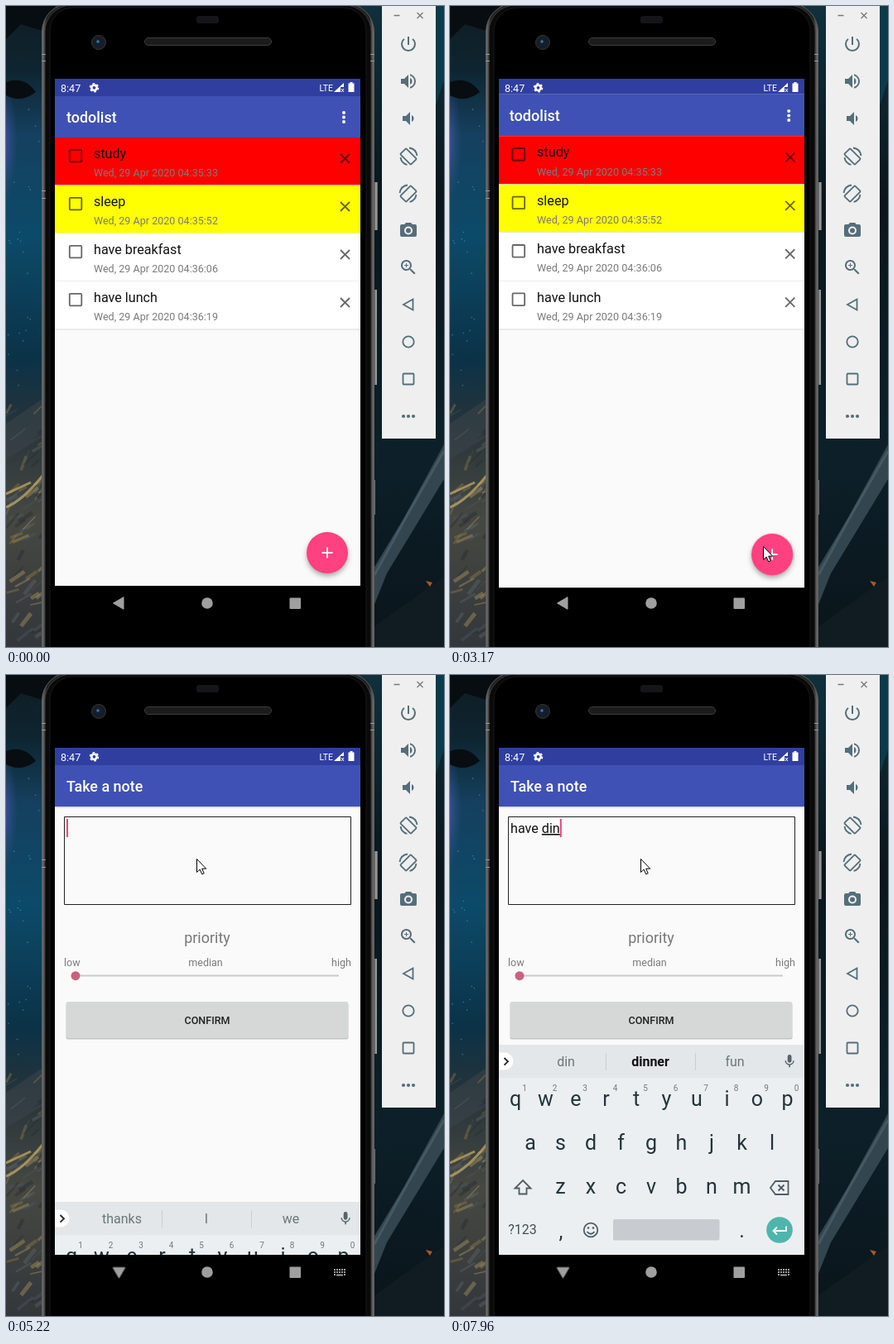
Animation of 529 by 775 pixels, one loop 8 s. Source, as an HTML page:

```html
<!DOCTYPE html>
<html lang="en">
<head>
<meta charset="utf-8">
<title>Todo list</title>
<style>
html, body { margin: 0; width: 100%; height: 100%; overflow: hidden; background: #0b1a24; }
svg { display: block; }
text { font-family: Roboto, sans-serif; white-space: pre; }
.mid { text-anchor: middle; }
.end { text-anchor: end; }
.title { font-size: 17.95px; font-weight: 500; fill: #fff; }
.item { font-size: 16.15px; fill: #111; }
.small { font-size: 12.57px; fill: #7b7b7b; }
.line { fill: none; stroke-width: 1.8; }
.key { font-size: 25px; fill: #22343c; text-anchor: middle; }
.hint { font-size: 10px; fill: #6f7b81; text-anchor: middle; }
.word { font-size: 16px; fill: #6b767b; text-anchor: middle; }
.bold { font-weight: 700; fill: #111; }
#composing { text-decoration: underline; }

.anim { animation: 8s step-end infinite; }
#cursor { animation-name: cursor; }
#tap { animation-name: tap; }
#ripple { animation-name: ripple; }
#lift { animation-name: lift; }
#list { animation-name: listOut; transform-origin: 243px 394px; }
#note { animation-name: noteIn; transform-origin: 243px 394px; }
#keyboard { animation-name: keyboard; }
#caret { animation-name: caret; }
#back { animation-name: back; transform-origin: 136.5px 722px; }
#ime { animation-name: ime; }
#edges { animation-name: edges; }

@keyframes cursor {
  0% { transform: translate(411px, 800px); }
  6.75% { transform: translate(410px, 766px); }
  7.75% { transform: translate(404px, 744px); }
  8.63% { transform: translate(392px, 718px); }
  9.63% { transform: translate(377px, 692px); }
  10.5% { transform: translate(367px, 673px); }
  11.5% { transform: translate(370px, 660px); }
  12.5% { transform: translate(378px, 653px); }
  45.5% { transform: translate(352px, 592px); }
  46.5% { transform: translate(312px, 499px); }
  47.5% { transform: translate(283px, 417px); }
  48.5% { transform: translate(262px, 350px); }
  49.5% { transform: translate(248px, 300px); }
  50.5% { transform: translate(238px, 262px); }
  51.5% { transform: translate(232px, 238px); }
  52.5% { transform: translate(230px, 226px); }
  53.38%, 100% { transform: translate(230px, 222px); }
}
@keyframes tap {
  0%, 17.5%, 56.38%, 100% { opacity: 0; }
  16.375%, 55.375% { opacity: 1; }
}
@keyframes ripple {
  0%, 25.12%, 100% { opacity: 0; }
  19.25%, 24.12% { opacity: .1; }
  20.25% { opacity: .16; }
  21.25% { opacity: .2; }
}
@keyframes lift {
  0%, 37.75%, 100% { opacity: 0; }
  19.25% { opacity: .4; }
  20.25% { opacity: .7; }
  21.25% { opacity: 1; }
}
@keyframes listOut {
  0%, 100% { transform: none; }
  39.625% { transform: scale(1.0075); }
  40.625% { transform: scale(1.03); }
  41.75% { transform: scale(1.046); }
  43.625%, 99.99% { transform: none; }
}
@keyframes noteIn {
  0% { opacity: 0; transform: scale(.85); }
  40.625% { opacity: .6; transform: scale(.91); }
  41.75% { opacity: 1; transform: scale(.975); }
  43.625%, 100% { opacity: 1; transform: none; }
}
@keyframes keyboard {
  0% { transform: translateY(270px); }
  64.375% { transform: translateY(190px); }
  65.375% { transform: translateY(105px); }
  66.375% { transform: translateY(45px); }
  67.25% { transform: translateY(12px); }
  68.25%, 100% { transform: none; }
}
@keyframes caret {
  0% { fill: transparent; }
  45.5% { fill: #cc6384; }
  48.5% { fill: #ff4081; }
  52.5% { fill: transparent; }
  55.375% { fill: #ff4081; }
  65.375% { fill: transparent; }
  68.25% { fill: #8f7886; }
  71.375% { fill: #e8437a; }
  92.625% { fill: transparent; }
  95.5%, 100% { fill: #e8437a; }
}
@keyframes back {
  0% { transform: none; }
  60.375% { transform: rotate(-35deg); }
  62.25% { transform: rotate(-80deg); }
  64.375%, 100% { transform: rotate(-90deg); }
}
@keyframes ime {
  0% { opacity: 0; }
  59.25%, 100% { opacity: 1; }
}
@keyframes edges {
  0%, 64.375%, 100% { opacity: 0; }
  43.625% { opacity: 1; }
}
</style>
</head>
<body>
<svg width="529" height="775" viewBox="0 0 529 775">
  <defs>
    <linearGradient id="leftSea" x2="0" y2="1">
      <stop offset="0" stop-color="#101c22"/><stop offset=".1" stop-color="#0e2531"/>
      <stop offset=".2" stop-color="#15405f"/><stop offset=".36" stop-color="#0c4a69"/>
      <stop offset=".55" stop-color="#0b3247"/><stop offset=".65" stop-color="#26333a"/>
      <stop offset=".8" stop-color="#464841"/><stop offset="1" stop-color="#33373b"/>
    </linearGradient>
    <linearGradient id="rightSea" x2="0" y2="1">
      <stop offset="0" stop-color="#10303c"/><stop offset=".3" stop-color="#0a161c"/>
      <stop offset=".7" stop-color="#0d2029"/><stop offset="1" stop-color="#0a141a"/>
    </linearGradient>
    <radialGradient id="glow"><stop stop-color="#4a52a8"/><stop offset="1" stop-color="#2a4f8c" stop-opacity="0"/></radialGradient>
    <linearGradient id="rim"><stop stop-color="#777"/><stop offset=".015" stop-color="#222"/><stop offset=".985" stop-color="#222"/><stop offset="1" stop-color="#777"/></linearGradient>
    <linearGradient id="metal"><stop stop-color="#333"/><stop offset=".6" stop-color="#aaa"/><stop offset="1" stop-color="#555"/></linearGradient>
    <filter id="blur" x="-40%" y="-40%" width="180%" height="180%"><feGaussianBlur stdDeviation="3.5"/></filter>
    <clipPath id="window"><path d="M59 88h369v627H59z"/></clipPath>
    <clipPath id="screen"><path d="M59 88h369v613H59z"/></clipPath>
  </defs>

  <!-- wallpaper -->
  <path fill="url(#leftSea)" d="M0 0h70v775H0z"/>
  <path fill="url(#rightSea)" d="M420 0h109v775H420z"/>
  <ellipse cx="-4" cy="165" rx="18" ry="75" fill="url(#glow)"/>
  <path fill="#070d10" d="M0 0h60L44 30 18 22 0 40zM0 92q22-8 36 12-18 14-36 4z"/>
  <path fill="#39434a" opacity=".6" d="M0 505l44-30v46L0 548z"/>
  <g id="strokes" fill="none"/>
  <path fill="#33454f" d="M529 530v42L460 686l-16 40v-46l36-60z"/>
  <path fill="none" stroke="#536874" stroke-width="3" opacity=".6" d="M529 538l-48 84-36 66"/>
  <path fill="#101c22" d="M529 690l-84 60v25h84z"/>
  <path fill="#0a3b4a" d="M519 0h10v90l-10 30z"/>
  <path fill="#a5592b" d="M507 695l8 2-3 5z"/>

  <!-- handset -->
  <g fill="url(#metal)">
    <path d="M444 213h5v58h-5zM444 343h4v115h-4zM444 573h2v42h-2z"/>
  </g>
  <rect x="43.5" y="-3" width="401" height="820" rx="34" fill="url(#rim)" stroke="#5c5c5c"/>
  <rect x="47" y="-1" width="394" height="820" rx="32" fill="#0a0a0a" stroke="#3a3a3a"/>
  <rect x="53" y="2" width="382" height="820" rx="28" fill="#000" stroke="#181818"/>
  <path stroke="#999" d="M43 58.500h5M43 66.500h5M43 223.500h5M43 232.500h5M440 58.500h5M440 66.500h5"/>
  <rect x="230" y="12" width="27" height="9" rx="3" fill="#15151a"/>
  <rect x="167.500" y="38.500" width="153" height="9" rx="4.500" fill="#1c1c1c" stroke="#3b3b3b"/>
  <circle cx="112" cy="44" r="8.500" fill="#1b1d20" stroke="#33363a"/>
  <circle cx="112" cy="44" r="4.500" fill="#0d2038"/>
  <circle cx="111" cy="43" r="1.800" fill="#4a6f96"/>

  <g clip-path="url(#window)">
    <g id="list" class="anim">
      <path fill="#fafafa" d="M59 88h369v613H59z"/>
      <path fill="#303f9f" d="M59 80h369v29H59z"/>
      <path fill="#3f51b5" d="M59 109h369v50H59z"/>
      <text class="title" x="73" y="141">todolist</text>
      <g fill="#fff"><circle cx="408" cy="129" r="2"/><circle cx="408" cy="134.500" r="2"/><circle cx="408" cy="140" r="2"/></g>
      <g id="rows"/>
      <circle class="anim" id="lift" cx="388" cy="667" r="24" opacity="0" fill="#0004" filter="url(#blur)"/>
      <circle cx="388" cy="664.500" r="24" fill="#0006" filter="url(#blur)"/>
      <circle cx="388" cy="661" r="25" fill="#ff4081"/>
      <circle class="anim" id="ripple" cx="388" cy="661" r="25" fill="#fff" opacity="0"/>
      <path stroke="#fff" stroke-width="1.800" d="M381.500 661h13M388 654.500v13"/>
    </g>

    <g id="note" class="anim">
      <path fill="#fafafa" d="M59 88h369v613H59z"/>
      <path fill="#303f9f" d="M59 88h369v21H59z"/>
      <path fill="#d5d5d8" d="M59 159h369v1.500H59z"/>
      <path fill="#3f51b5" d="M59 109h369v50H59z"/>
      <text class="title" x="73" y="141">Take a note</text>
      <path fill="none" stroke="#222" d="M70.500 171.500h346v106h-346z"/>
      <text class="item" x="73" y="191" id="typed"><tspan id="done"></tspan><tspan id="composing"></tspan></text>
      <rect class="anim" id="caret" x="73" y="174" width="2" height="22"/>
      <text class="mid" x="243" y="324" font-size="17.950" fill="#777">priority</text>
      <text class="small" x="70" y="352">low</text>
      <text class="small mid" x="241" y="352">median</text>
      <text class="small end" x="417" y="352">high</text>
      <path stroke="#cbcbcb" stroke-width="1.800" d="M84 363.500h318"/>
      <circle cx="84" cy="363.700" r="5.500" fill="#c9627f"/>
      <rect x="72.500" y="396" width="341" height="44.500" rx="2" fill="#c3c4c4"/>
      <rect x="73" y="395" width="340" height="44" rx="2" fill="#d6d7d7"/>
      <text class="mid" x="243" y="421.500" font-size="12.570" font-weight="500" fill="#222">CONFIRM</text>
    </g>
  </g>

  <!-- status bar -->
  <g fill="#fff">
    <text x="66" y="103.500" font-size="12.570">8:47</text>
    <circle cx="106.500" cy="98.800" r="3.200" fill="none" stroke="#fff" stroke-width="2.600"/>
    <circle cx="106.500" cy="98.800" r="5" fill="none" stroke="#fff" stroke-width="1.600" stroke-dasharray="2.600 2.636"/>
    <text x="378.500" y="102.500" font-size="10.500">LTE</text>
    <path d="M408 93v5h-4v6h-8z"/>
    <path stroke="#fff" d="M405 100l3 4M408 100l-3 4"/>
    <path d="M415.500 92h3v1.500h2V104h-7V93.500h2z"/>
  </g>

  <!-- navigation bar -->
  <path class="anim" id="edges" stroke="#2b2b2b" opacity="0" d="M59.500 701v14M426.500 701v14"/>
  <g fill="#9f9f9f">
    <path class="anim" id="back" stroke="#9f9f9f" stroke-linejoin="round" d="M129.500 722l12.500-7.300v14.600z"/>
    <circle cx="243" cy="722" r="6.800"/>
    <rect x="342.500" y="715.500" width="13.500" height="13.500" rx="1"/>
  </g>
  <g class="anim" id="ime" opacity="0" stroke="#9f9f9f" stroke-width="2" stroke-dasharray="2 1">
    <path d="M396 719h14M396 722h14M396 725h2M408 725h2"/>
    <path stroke-dasharray="none" d="M399 725.500h8"/>
  </g>

  <g clip-path="url(#screen)">
    <g id="keyboard" class="anim" transform="translate(0 270)">
      <path fill="#eceff1" d="M59 447h369v254H59z"/>
      <path fill="#e3e7e9" d="M59 447h369v40H59z"/>
      <path fill="#fff" d="M59 456.500h7a10.500 10.500 0 0 1 0 21h-7z"/>
      <path fill="none" stroke="#222" stroke-width="1.800" d="M65.500 463l4.500 4.300-4.500 4.300"/>
      <path stroke="#c9ced1" d="M188.500 457v21M296.500 457v21"/>
      <text class="word" x="140" y="473"></text>
      <text class="word" x="242" y="473"></text>
      <text class="word" x="344" y="473"></text>
      <path fill="#56646b" transform="translate(400.500 457.500) scale(.8)" d="M12 14c1.660 0 3-1.340 3-3V5a3 3 0 0 0-6 0v6c0 1.660 1.340 3 3 3zm5.300-3c0 3-2.540 5.100-5.300 5.100S6.700 14 6.700 11H5c0 3.410 2.720 6.230 6 6.720V21h2v-3.280c3.280-.480 6-3.300 6-6.720z"/>
      <g id="keys"/>
      <g class="line" stroke="#4d5d65" stroke-width="1.600">
        <path d="M88 611l9.500 9.500h-5v7h-9v-7h-5z"/>
        <path d="M393 612h15.500v16H393l-6-8zM396.500 616.500l7 7M403.500 616.500l-7 7"/>
        <circle cx="170" cy="671" r="8.300"/>
        <path d="M165.500 673q4.500 5.500 9 0"/>
      </g>
      <g fill="#4d5d65"><circle cx="167" cy="668.500" r="1.300"/><circle cx="173" cy="668.500" r="1.300"/></g>
      <text class="mid" x="87.500" y="676" font-size="16" fill="#3f5059">?123</text>
      <text class="key" x="134" y="681">,</text>
      <text class="key" x="352.500" y="680">.</text>
      <rect x="197" y="658" width="128.500" height="25.500" rx="2" fill="#c8ccd0"/>
      <circle cx="398" cy="671" r="15.800" fill="#4db6ac"/>
      <path class="line" stroke="#fff" d="M406 666.500v5.500h-15M395 667.500l-4.500 4.500 4.500 4.500"/>
    </g>
  </g>

  <!-- emulator controls -->
  <path fill="#efefef" d="M454 0h65v523h-65z"/>
  <path stroke="#777" stroke-width="1.300" d="M468.500 11.500h7M496.500 8l7 7M503.500 8l-7 7"/>
  <g id="tools" fill="#546e7a"/>
  <g class="line" stroke="#546e7a">
    <g id="turn">
      <rect x="-5" y="-9" width="10" height="18" rx="1" transform="translate(486 182) rotate(-45)"/>
      <path d="M487 171.500q8 1 9.500 9.500M476.500 183q1 7 8 9"/>
    </g>
    <use href="#turn" transform="matrix(-1 0 0 1 972 45)"/>
    <path d="M480 361l11.500-6.500v13z"/>
    <circle cx="486" cy="406" r="6.700"/>
    <rect x="479.500" y="444.500" width="13" height="13" rx="1"/>
  </g>
  <g fill="#546e7a"><circle cx="480" cy="496" r="2.100"/><circle cx="486" cy="496" r="2.100"/><circle cx="492" cy="496" r="2.100"/></g>

  <g id="cursor" class="anim" transform="translate(411 800)">
    <path fill="#fff" stroke="#000" d="M.5.500v16l3.700-3.400 2.500 5.700 2.500-1-2.500-5.600h5z"/>
    <circle class="anim" id="tap" r="15" fill="#fff03c" fill-opacity=".55" opacity="0"/>
  </g>
</svg>
<script>
const $ = id => document.getElementById(id);

const items = [
  ["study", "04:35:33", "#f00"], ["sleep", "04:35:52", "#ff0"],
  ["have breakfast", "04:36:06", "#fff"], ["have lunch", "04:36:19", "#fff"]
];
$("rows").innerHTML = items.map(([name, time, color], i) => `
  <g transform="translate(0 ${i * 58})">
    <path fill="${color}" d="M59 159h369v57.500H59z"/>
    <path stroke="#dcdcdc" d="M59 217h369"/>
    <rect class="line" x="76.800" y="173.800" width="14.500" height="14.500" rx="1" stroke="#0009"/>
    <text class="item" x="106" y="184">${name}</text>
    <text class="small" x="106" y="206">Wed, 29 Apr 2020 ${time}</text>
    <path class="line" stroke="#0009" d="M404 179l11 11M415 179l-11 11"/>
  </g>`).join("");

const keyRows = [["qwertyuiop", 79, 521], ["asdfghjkl", 97, 574], ["zxcvbnm", 133.5, 627]];
$("keys").innerHTML = keyRows.map(([letters, x, y], row) => [...letters].map((c, i) => {
  const cx = x + i * 36.5;
  const hint = row ? "" : `<text class="hint" x="${cx + 11}" y="503">${(i + 1) % 10}</text>`;
  return `<text class="key" x="${cx}" y="${y}">${c}</text>${hint}`;
}).join("")).join("");

const icons = [
  [46, "M13 3h-2v10h2zm4.830 2.170l-1.420 1.420A7 7 0 1 1 7.580 6.580L6.170 5.170a9 9 0 1 0 11.660 0z"],
  [91, "M3 9v6h4l5 5V4L7 9zm13.500 3c0-1.770-1-3.290-2.500-4v8c1.500-.700 2.500-2.230 2.500-4zM14 3.230v2.060a7 7 0 0 1 0 13.420v2.060a9 9 0 0 0 0-17.540z"],
  [136, "M18.500 12c0-1.770-1-3.290-2.500-4v8c1.500-.700 2.500-2.230 2.500-4zM5 9v6h4l5 5V4L9 9z"],
  [271, "M9 3L7.200 5H4a2 2 0 0 0-2 2v11a2 2 0 0 0 2 2h16a2 2 0 0 0 2-2V7a2 2 0 0 0-2-2h-3.200L15 3zm3 14.500a5 5 0 1 1 0-10 5 5 0 0 1 0 10zm0-2a3 3 0 1 0 0-6 3 3 0 0 0 0 6z"],
  [316, "M15.500 14h-.800l-.300-.300a6.500 6.500 0 1 0-.700.700l.300.300v.800l5 5 1.500-1.500zm-6 0a4.500 4.500 0 1 1 0-9 4.500 4.500 0 0 1 0 9zm2.500-4h-2v2H9v-2H7V9h2V7h1v2h2z"]
];
$("tools").innerHTML = icons.map(([y, d]) =>
  `<path fill-rule="evenodd" transform="translate(474 ${y - 12})" d="${d}"/>`).join("");

// Seeded brush marks and bubbles in the wallpaper
let seed = 11;
const rand = () => (seed = seed * 16807 % 2147483647) / 2147483647;
const paints = ["#8a7648", "#5c6263", "#262d33", "#a8935f", "#4b5560"];
let marks = "";
for (let i = 0; i < 60; i++) {
  const x = rand() * 42, y = 490 + rand() * 280;
  marks += `<path stroke="${paints[i % 5]}" stroke-width="${1 + rand() * 4}" opacity=".45" d="M${x} ${y}l${6 + rand() * 14} ${-4 - rand() * 14}"/>`;
}
for (let i = 0; i < 22; i++)
  marks += `<circle cx="${rand() * 42}" cy="${120 + rand() * 350}" r=".800" fill="#4f93ad" opacity=".7"/>`;
marks += `<path stroke="#c8b06a" stroke-width="3" opacity=".7" d="M0 606q20-8 44-38M0 590l30-14"/>`;
$("strokes").innerHTML = marks;

// time, finished text, word being typed, suggestions
const typing = [
  [0, "", "", "thanks", "I", "we"],
  [5710, "", "h", "he", "have", "has"],
  [5870, "", "ha", "ha", "have", "had"],
  [6250, "", "hav", "hav", "have", "having"],
  [6400, "", "have", "haven", "have", "has"],
  [6860, "have ", "", "you", "a", "been"],
  [7640, "have ", "d", "d", "do", "dinner"],
  [7810, "have ", "di", "di", "dinner", "did"],
  [7960, "have ", "din", "din", "dinner", "fun"]
];
const words = document.querySelectorAll(".word");
let shown, start;

function show(state) {
  const [, done, composing, ...tips] = state;
  $("done").textContent = done;
  $("composing").textContent = composing;
  const width = done || composing ? $("typed").getComputedTextLength() : 0;
  $("caret").setAttribute("x", 73 + width);
  words.forEach((w, i) => w.textContent = tips[i]);
  words[1].classList.toggle("bold", composing !== "");
}

function tick(now) {
  start ??= now;
  const t = (now - start) % 8000;
  const state = typing.findLast(s => s[0] <= t);
  if (state !== shown) show(shown = state);
  requestAnimationFrame(tick);
}
requestAnimationFrame(tick);
</script>
</body>
</html>
```
